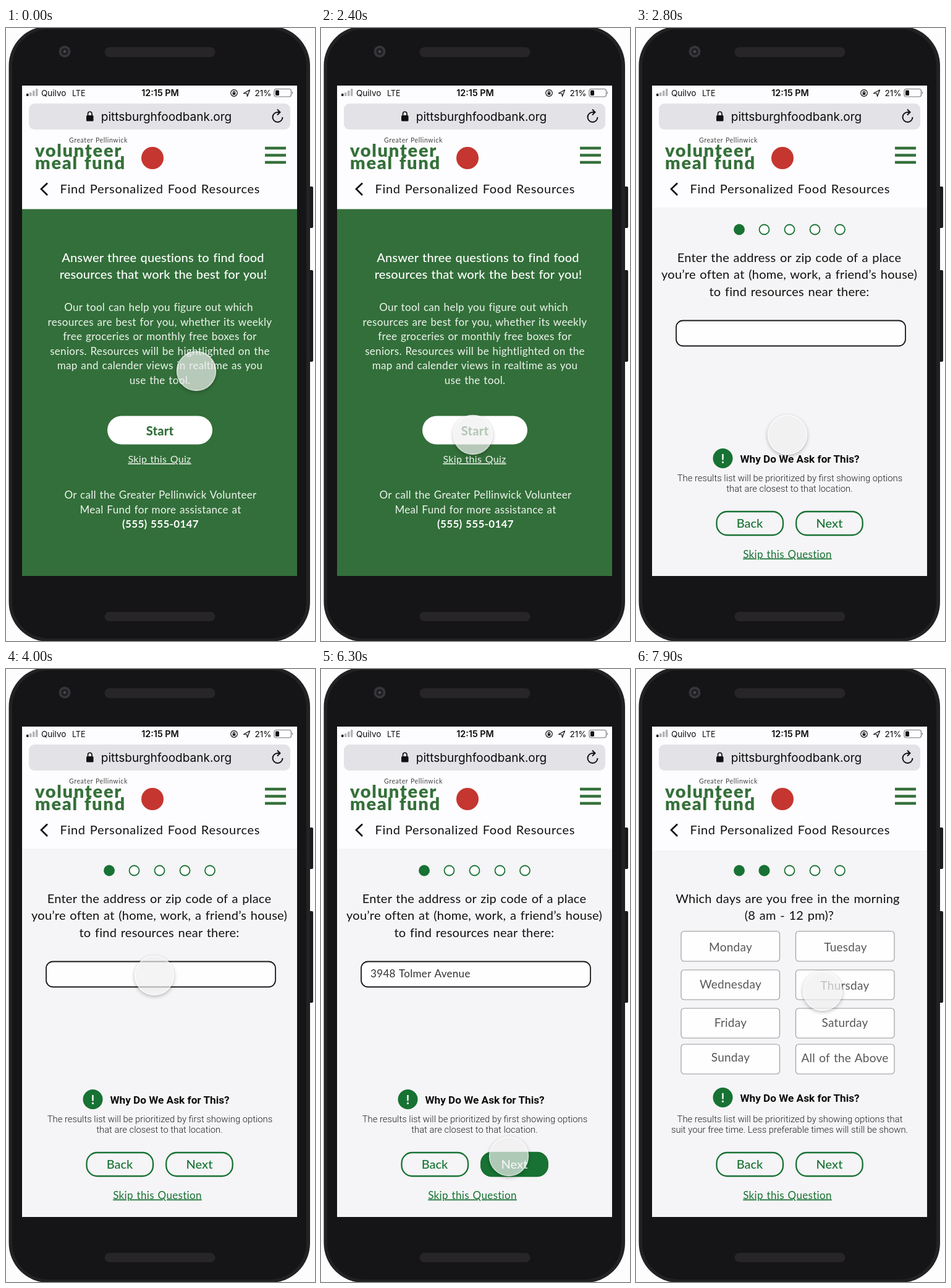
An HTML page that plays this animation: 500x990 px, repeating every 8 s.

```html
<!DOCTYPE html>
<html lang="en">
<head>
<meta charset="utf-8">
<title>Food resource quiz</title>
<style>
  html, body { margin: 0; width: 100%; height: 100%; overflow: hidden; background: #fdfdfd; }
  svg { display: block; width: 100vw; height: 100vh; }

  /* Type */
  text { font-family: Lato, "Open Sans", sans-serif; word-spacing: .06em; }
  .mid { text-anchor: middle; }
  .ui { font-family: Inter, Roboto, sans-serif; word-spacing: 0; fill: #0b0b0b; }
  .title { font-size: 20px; letter-spacing: .7px; fill: #111; }
  .lead { font-size: 20px; font-weight: 500; letter-spacing: .12px; fill: #fff; }
  .body { font-size: 17px; letter-spacing: .32px; fill: #eef4ee; }
  .strong { font-weight: 700; fill: #fff; }
  .skip { font-size: 16px; text-decoration: underline; }
  .start { font-size: 20px; font-weight: 800; letter-spacing: .2px; fill: #336f3a; }
  .ask { font-size: 20px; letter-spacing: .25px; fill: #111; }
  .entry { font-size: 17px; letter-spacing: .33px; fill: #333; }
  .day { font-size: 19px; letter-spacing: .25px; fill: #58585a; }
  .btn { font-size: 20px; font-weight: 500; fill: #177233; }
  .light { fill: #fff; }
  .link { font-size: 17px; letter-spacing: .33px; fill: #177233; text-decoration: underline; }
  .why { font: 700 17.2px Roboto, sans-serif; word-spacing: 0; fill: #0c0c0c; }
  .note { font: 300 14.8px Roboto, sans-serif; word-spacing: 0; fill: #222; }
  .brand { font-size: 29px; font-weight: 900; letter-spacing: 1.7px; fill: #35703a; }

  /* Shapes */
  .ring { fill: #fefefe; stroke: #177233; stroke-width: 1.8; }
  .solid { fill: #177233; }
  .pill { fill: none; stroke: #177233; stroke-width: 2.3; }
  .box { fill: #fefefe; stroke: #97979a; stroke-width: 1.1; }

  /* Motion: one cycle is 8 s, so 1% is 80 ms */
  .anim, .cursor, .page { animation: 8s linear infinite; }
  .page { animation-name: page; }
  .intro { animation-name: intro; }
  .quiz { animation-name: quiz; }
  .first { animation-name: first; }
  .second { animation-name: second; }
  .typed { animation-name: typed; }
  .chosen { animation-name: chosen; }
  .pressed { animation-name: pressed; }
  .info { animation-name: info; }
  .cursor { animation-name: cursor; animation-timing-function: ease-in-out; }

  @keyframes page {
    0%, 31.5% { fill: #336f3a; transform: translateY(2.5px); }
    35%, 83% { fill: #f5f4f6; transform: none; }
    86.5%, 100% { fill: #f5f4f6; transform: translateY(3px); }
  }
  @keyframes intro { 0%, 31.5% { opacity: 1; } 35%, 100% { opacity: 0; } }
  @keyframes quiz { 0%, 31.5% { opacity: 0; } 35%, 100% { opacity: 1; } }
  @keyframes first { 0%, 83% { opacity: 1; } 86.5%, 100% { opacity: 0; } }
  @keyframes second { 0%, 83% { opacity: 0; } 86.5%, 100% { opacity: 1; } }
  @keyframes typed { 0%, 50% { opacity: 0; } 53.5%, 67.5% { opacity: 1; } 71%, 100% { opacity: 0; } }
  @keyframes chosen { 0%, 67.5% { opacity: 0; } 71%, 100% { opacity: 1; } }
  @keyframes pressed { 0%, 75% { opacity: 0; } 77.5%, 83% { opacity: 1; } 86.5%, 100% { opacity: 0; } }
  @keyframes info { 0%, 83% { transform: none; } 86.5%, 100% { transform: translateY(-3px); } }
  @keyframes cursor {
    0% { transform: translate(308px, 554px); }
    18%, 22% { transform: translate(277px, 653px); }
    31%, 40% { transform: translate(245px, 657px); }
    47%, 51% { transform: translate(240px, 495px); }
    59%, 67% { transform: translate(214px, 534px); }
    76%, 85% { transform: translate(304px, 787px); }
    98%, 100% { transform: translate(302px, 520px); }
  }
</style>
</head>
<body>
<svg viewBox="0 0 500 990">
  <defs>
    <filter id="soft" x="-30%" y="-30%" width="160%" height="160%">
      <feGaussianBlur stdDeviation="3"/>
    </filter>
    <mask id="outside">
      <rect x="-50" y="-50" width="100" height="100" fill="#fff"/>
      <circle r="32"/>
    </mask>
  </defs>

  <!-- Phone -->
  <rect x="488" y="256" width="9" height="67" rx="2" fill="#1b1a1c"/>
  <rect x="488" y="391" width="9" height="148" rx="2" fill="#1b1a1c"/>
  <rect x="4.5" y="-3" width="487.5" height="994" rx="64" fill="#222123"/>
  <rect x="10" y="2" width="476" height="984" rx="59" fill="#151416"/>
  <circle cx="95" cy="38" r="9.5" fill="#363539"/>
  <circle cx="95" cy="38" r="5.5" fill="#1c1c20"/>
  <circle cx="95" cy="38" r="2.5" fill="#46454c"/>
  <rect x="159.5" y="31" width="179" height="16" rx="8" fill="#272527"/>
  <rect x="159.5" y="943" width="179" height="15" rx="7.5" fill="#272527"/>

  <!-- Browser -->
  <rect x="26" y="93" width="445" height="792" fill="#fdfcfe"/>
  <g fill="#b4b4b6">
    <rect x="33" y="106" width="3.5" height="4" rx="1" fill="#111"/>
    <rect x="38" y="104" width="3.5" height="6" rx="1"/>
    <rect x="43" y="101" width="3.5" height="9" rx="1"/>
    <rect x="48" y="98" width="3.5" height="12" rx="1"/>
  </g>
  <text class="ui" x="57" y="110" font-size="13.5">Quilvo</text>
  <text class="ui" x="107" y="110" font-size="12.5">LTE</text>
  <text class="ui mid" x="249.5" y="110" font-size="14.3" font-weight="600">12:15 PM</text>
  <g fill="none" stroke="#111" stroke-width="1.2">
    <circle cx="369" cy="105" r="5.3"/>
    <path d="M367.5 104.5v-1a1.5 1.5 0 0 1 3 0v1"/>
    <path d="M384.5 105.5l10-5.5-4 10.5-.8-4.7z" stroke-linejoin="round"/>
    <rect x="434" y="98.5" width="27.5" height="12.5" rx="3.5" stroke="#77777a"/>
  </g>
  <rect x="366.7" y="104.3" width="4.6" height="3.5" fill="#111"/>
  <rect x="436" y="100.5" width="6" height="8.5" rx="1.5" fill="#111"/>
  <path d="M463 102.5q2.5 2 0 4.5z" fill="#77777a"/>
  <text class="ui" x="402.5" y="110" font-size="13.5">21%</text>

  <rect x="37" y="122" width="423" height="42" rx="9" fill="#e3e2e6"/>
  <rect x="130" y="141" width="11.5" height="9.5" rx="1.5" fill="#111"/>
  <path d="M132.500 142v-3.500a3.200 3.200 0 0 1 6.500 0v3.500" fill="none" stroke="#111" stroke-width="1.7"/>
  <text class="ui mid" x="259.5" y="150" font-size="19">pittsburghfoodbank.org</text>
  <g fill="none" stroke="#111" stroke-width="2">
    <path d="M447.5 144a8 8 0 1 1-8-8h3"/>
    <path d="M439 131.5l4.5 4.5-4.5 4.5"/>
  </g>

  <!-- Site header -->
  <text x="102" y="185" font-size="10.5" letter-spacing=".6" fill="#444">Greater Pellinwick</text>
  <text class="brand" x="47" y="208">volunteer</text>
  <text class="brand" x="47" y="228">meal fund</text>
  <circle cx="237" cy="210" r="18" fill="#c4362f"/>
  <path d="M419 194h34M419 205.500h34M419 217h34" stroke="#35703a" stroke-width="4.6"/>
  <path d="M67 250.500l-10 9.500 10 10" fill="none" stroke="#111" stroke-width="2.7"/>
  <text class="title" x="87.5" y="267">Find Personalized Food Resources</text>

  <svg x="26" y="290" width="445" height="595" viewBox="26 290 445 595">
    <rect class="page" x="26" y="290" width="445" height="600"/>
  </svg>

  <!-- Intro -->
  <g class="anim intro">
    <g class="mid">
      <text class="lead" x="254" y="378">Answer three questions to find food</text>
      <text class="lead" x="254.5" y="405">resources that work the best for you!</text>
      <text class="body" x="247" y="457">Our tool can help you figure out which</text>
      <text class="body" x="249" y="481">resources are best for you, whether its weekly</text>
      <text class="body" x="249" y="504">free groceries or monthly free boxes for</text>
      <text class="body" x="249" y="528">seniors. Resources will be hightlighted on the</text>
      <text class="body" x="249" y="551">map and calender views in realtime as you</text>
      <text class="body" x="249" y="575">use the tool.</text>
    </g>
    <rect x="164" y="626.5" width="170" height="46" rx="23" fill="#fff"/>
    <g class="mid">
      <text class="start" x="249" y="657.5">Start</text>
      <text class="body skip" x="248.5" y="702">Skip this Quiz</text>
      <text class="body" x="250" y="760">Or call the Greater Pellinwick Volunteer</text>
      <text class="body" x="250" y="784">Meal Fund for more assistance at</text>
      <text class="body strong" x="250" y="807">(555) 555-0147</text>
    </g>
  </g>

  <!-- Quiz -->
  <g class="anim quiz">
    <circle class="solid" cx="167" cy="325.5" r="8.9"/>
    <g class="ring">
      <circle cx="207.5" cy="325.5" r="8"/>
      <circle cx="248.5" cy="325.5" r="8"/>
      <circle cx="289.5" cy="325.5" r="8"/>
      <circle cx="330" cy="325.5" r="8"/>
    </g>
    <g class="anim info">
      <circle class="solid" cx="140.5" cy="695" r="16"/>
      <text class="mid" x="140.5" y="702.5" font-size="21" font-weight="700" fill="#fff">!</text>
      <text class="why" x="168.5" y="702">Why Do We Ask for This?</text>
    </g>
    <rect class="pill" x="130.5" y="781" width="107.5" height="38" rx="17"/>
    <text class="btn mid" x="184" y="806.5">Back</text>
    <rect class="pill" x="259.2" y="781" width="107.5" height="38" rx="17"/>
    <text class="btn mid" x="313" y="806.5">Next</text>
    <text class="link mid" x="245" y="855.5">Skip this Question</text>

    <g class="anim first">
      <g class="mid">
        <text class="ask" x="248" y="378">Enter the address or zip code of a place</text>
        <text class="ask" x="248" y="405">you’re often at (home, work, a friend’s house)</text>
        <text class="ask" x="248" y="432.5">to find resources near there:</text>
        <text class="note" x="249" y="732">The results list will be prioritized by first showing options</text>
        <text class="note" x="248.5" y="749">that are closest to that location.</text>
      </g>
      <g class="anim typed">
        <path d="M65 500V599a13 13 0 0 0 13 13H422a13 13 0 0 0 13-13V500" fill="#f7f6f8" stroke="#444" stroke-width="1.1"/>
        <text class="entry" x="80" y="539">3948 Tolmer Avenue</text>
        <text class="entry" x="80" y="567.5">3948 Quennibar Street</text>
        <text class="entry" x="80" y="597">3948 Pellow Avenue</text>
      </g>
      <rect x="65" y="472.5" width="371" height="41" rx="11" fill="#fefefe" stroke="#1a1a1c" stroke-width="1.8"/>
      <text class="entry anim typed" x="80" y="498">3948</text>
      <text class="entry anim chosen" x="80" y="498">3948 Tolmer Avenue</text>
      <g class="anim pressed">
        <rect class="solid" x="258.2" y="780" width="109.5" height="40" rx="18"/>
        <text class="btn light mid" x="313" y="807">Next</text>
      </g>
    </g>

    <g class="anim second">
      <circle class="solid" cx="207.5" cy="325.5" r="8.9"/>
      <g class="mid">
        <text class="ask" x="245.5" y="378">Which days are you free in the morning</text>
        <text class="ask" x="248" y="405">(8 am - 12 pm)?</text>
        <text class="note" x="249" y="732">The results list will be prioritized by showing options that</text>
        <text class="note" x="248.5" y="749">suit your free time. Less preferable times will still be shown.</text>
      </g>
      <g class="box">
        <rect x="73" y="423.5" width="159.5" height="48.5" rx="5"/>
        <rect x="258.5" y="423.5" width="159.5" height="48.5" rx="5"/>
        <rect x="73" y="486" width="159.5" height="48" rx="5"/>
        <rect x="258.5" y="486" width="159.5" height="48" rx="5"/>
        <rect x="73" y="548" width="159.5" height="48" rx="5"/>
        <rect x="258.5" y="548" width="159.5" height="48" rx="5"/>
        <rect x="73" y="606" width="159.5" height="48" rx="5"/>
        <rect x="258.5" y="606" width="159.5" height="48" rx="5"/>
      </g>
      <g class="mid">
        <text class="day" x="153" y="455.5">Monday</text>
        <text class="day" x="339" y="455.5">Tuesday</text>
        <text class="day" x="153" y="515.5">Wednesday</text>
        <text class="day" x="338" y="517.5">Thursday</text>
        <text class="day" x="153" y="577.5">Friday</text>
        <text class="day" x="338" y="577.5">Saturday</text>
        <text class="day" x="153" y="633.5">Sunday</text>
        <text class="day" x="338" y="635">All of the Above</text>
      </g>
    </g>
  </g>

  <!-- Touch point -->
  <g class="cursor">
    <g mask="url(#outside)">
      <circle cy="2" r="32" opacity=".28" filter="url(#soft)"/>
    </g>
    <circle r="31.5" fill="#f0f0f0" fill-opacity=".7" stroke="#fff" stroke-opacity=".75" stroke-width="1.3"/>
  </g>
</svg>
</body>
</html>
```
